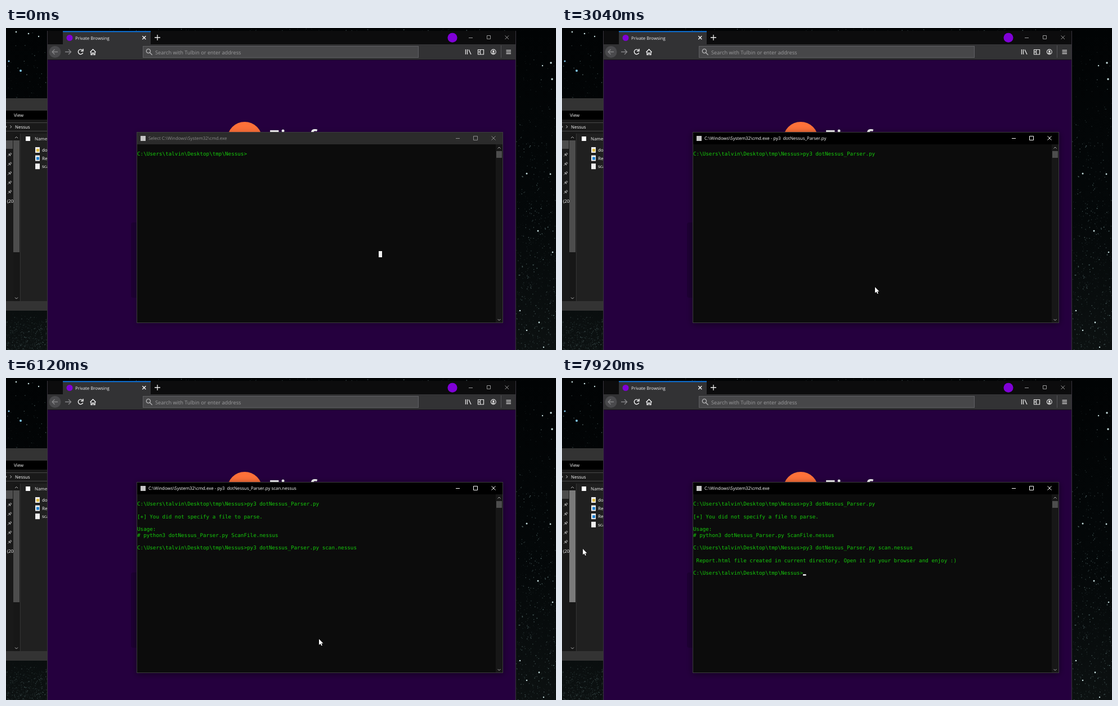
An HTML page with a canvas that plays this animation: 977 px wide and 573 px high, repeating every 8000 ms.

```html
<!DOCTYPE html>
<html lang="en">
<head>
<meta charset="utf-8">
<title>Parser demo</title>
<style>
html, body { margin: 0; width: 100%; height: 100%; overflow: hidden; background: #000; }
canvas { display: block; }
</style>
</head>
<body>
<canvas id="stage" width="977" height="573"></canvas>
<script>
const ctx = document.getElementById('stage').getContext('2d');
const LOOP = 8000;
const UI = '"Open Sans", sans-serif';
const MONO = '"DejaVu Sans Mono", monospace';

// Console grid
const CELL = 5.571, ROW = 11.14, LEFT = 233, BASE = 227.4;
const PROMPT = 'C:\\Users\\talvin\\Desktop\\tmp\\Nessus>';
const COMMAND = 'py3 dotNessus_Parser.py scan.nessus';
const TITLE = 'C:\\Windows\\System32\\cmd.exe';

// [time, characters typed]
const TYPED_FIRST = [[0, 0], [1160, 1], [1320, 2], [1440, 3], [1600, 4], [2240, 5], [2320, 6], [2400, 23]];
const TYPED_SECOND = [[0, 0], [4560, 23], [4800, 24], [4960, 25], [5120, 26], [5200, 35]];
const CARET_ON = [[840, 1920], [2240, 3040], [3240, 3800], [4560, 5960], [6280, 6880], [7840, LOOP]];
// [time, x, y] of the pointer tip
const POINTER = [[120, 590, 575], [360, 556, 461], [3800, 556, 461], [3960, 556, 464.5], [6920, 556, 464.5],
  [7400, 313, 314.5], [7640, 60, 296], [7720, 24, 300], [7800, 18, 302], [7880, 37, 304]];

function rect(x, y, w, h, color) {
  ctx.fillStyle = color;
  ctx.fillRect(x, y, w, h);
}
function frame(x, y, w, h, color) {
  ctx.strokeStyle = color;
  ctx.lineWidth = 1;
  ctx.strokeRect(x + .5, y + .5, w - 1, h - 1);
}
function disc(x, y, r, color) {
  ctx.fillStyle = color;
  ctx.beginPath();
  ctx.arc(x, y, r, 0, 7);
  ctx.fill();
}
function roundRect(x, y, w, h, r, color) {
  ctx.fillStyle = color;
  ctx.beginPath();
  ctx.roundRect(x, y, w, h, r);
  ctx.fill();
}
function stroke(path, color, width = 1) {
  ctx.strokeStyle = color;
  ctx.lineWidth = width;
  ctx.stroke(new Path2D(path));
}
function text(str, x, y, size, color, weight = 400) {
  ctx.font = `${weight} ${size}px ${UI}`;
  ctx.fillStyle = color;
  ctx.fillText(str, x, y);
}
function clipped(x, y, w, h, draw) {
  ctx.save();
  ctx.beginPath();
  ctx.rect(x, y, w, h);
  ctx.clip();
  draw();
  ctx.restore();
}
const held = (keys, t) => keys.filter(key => key[0] <= t).pop()[1];

function randomizer(seed) {
  return () => (seed = (seed * 16807) % 2147483647) / 2147483647;
}

function drawSky() {
  const glow = ctx.createLinearGradient(0, 0, 0, 573);
  glow.addColorStop(0, '#010304');
  glow.addColorStop(.6, '#040809');
  glow.addColorStop(1, '#0c1111');
  rect(0, 0, 977, 573, glow);
  const rand = randomizer(4711);
  const scatter = (count, x, y, w, h, strength) => {
    for (let i = 0; i < count; i++) {
      const size = .6 + rand() * 1.1, light = strength * (.15 + .85 * rand() ** 3);
      rect(x + rand() * w, y + Math.sqrt(rand()) * h, size, size, `rgba(165,205,205,${light})`);
    }
  };
  scatter(55, 0, 0, 73, 125, .5);
  scatter(600, 0, 503, 73, 70, .3);
  scatter(700, 906, 0, 71, 573, .55);
  scatter(60, 73, 0, 833, 5, .6);
  for (const [x, y, r] of [[26, 76, 2], [5, 59, 1.5], [58, 15, 1.2], [40, 10, 1.3], [18, 7, 1.3],
    [968, 62, 1.7], [970, 91, 1.7], [953, 67, 1.2], [925, 259, 1.5], [967, 260, 1.4],
    [945, 361, 1.5], [971, 399, 1.3], [947, 524, 1.4], [913, 503, 1.3], [925, 538, 1.3], [955, 568, 1.2]])
    disc(x, y, r, x < 30 && y > 50 ? '#7fc4e8' : '#c4dddd');
}

function drawFile(row, name, color) {
  const y = 217 + row * 14.6;
  rect(52, y - 5, 8, 10, '#f0f0f0');
  if (color) rect(54, y - 2, 5, 5, color);
  text(name, 64, y + 3, 7.9, '#fff');
}

function drawExplorer(t) {
  rect(0, 125, 73, 378, '#191919');
  rect(0, 125, 73, 22, '#333');
  rect(0, 147, 73, 16, '#000');
  text('View', 14, 158, 7.9, '#fff');
  rect(0, 168, 73, 1, '#484848');
  rect(0, 183, 73, 1, '#484848');
  stroke('M7.5 173.5l2.2 2.3l-2.2 2.3M-1 173.5l2 2.3l-2 2.3', '#ccc');
  text('Nessus', 16, 178.5, 7.9, '#fff');
  rect(25, 188, 48, 298, '#202020');
  rect(25, 188, 1, 298, '#333');
  rect(0, 200, 12, 15, '#4d4d4d');
  rect(13, 188, 11, 298, '#171717');
  rect(13, 200, 11, 199, t >= 7720 ? '#7a7a7a' : '#4d4d4d');
  stroke('M16 196l2.5-2.5l2.5 2.5M16 479.5l2.5 2.5l2.5-2.5', '#bbb');
  for (let i = 0; i < 5; i++) {
    const y = 225 + i * 16.6;
    stroke(`M3.2 ${y + 3.3}l3-3`, '#bbb', .8);
    stroke(`M4.5 ${y - 1}l3.5 3.5`, '#bbb', 1.1);
    stroke(`M6.3 ${y - .8}l2-2l1.6 1.6l-2 2z`, '#bbb', 1);
  }
  text('(20', 2, 310.5, 7.9, '#fff');
  rect(35, 193, 8, 8, '#fff');
  rect(0, 486, 73, 17, '#333');
  clipped(0, 125, 73, 378, () => {
    text('Name', 51, 200, 7.9, '#eee');
    const names = ['dotNessus_Parser.py', 'Readme.html', 'scan.nessus'];
    if (t >= 6960) names.splice(2, 0, 'Report.html');
    names.forEach((name, i) =>
      drawFile(i, name, name.endsWith('py') ? '#e0bd45' : name.endsWith('html') && '#1b7fd0'));
  });
}

function drawBrowser() {
  rect(73, 5, 833, 568, '#25003e');
  rect(73, 5, 833, 24, '#0c0c0d');
  rect(101, 6, 156, 23, '#323234');
  rect(101, 5.5, 156, 1.7, '#0a7ff5');
  disc(113, 17.5, 5.5, '#8000d7');
  text('Private Browsing', 123, 20.7, 7.8, '#f0f0f2');
  stroke('M242.3 14.3l6 6M248.3 14.3l-6 6', '#f9f9fa', 1.3);
  stroke('M264 17h10M269 12v10', '#f0f0f0', 1.3);
  disc(793, 17.3, 8.5, '#8000d7');
  stroke('M822 17.5h7M854.5 13.5h6v6h-6zM886.5 13.5l6.5 6.5M893 13.5l-6.5 6.5', '#999');

  rect(73, 29, 833, 27, '#323234');
  rect(73, 56, 833, 1, '#151017');
  disc(87, 42.5, 10.5, '#4a4a4d');
  stroke('M92 42.5h-9.5M86.5 38l-4.5 4.5l4.5 4.5', '#858587', 1.3);
  stroke('M105 42.5h10M111 38l4.5 4.5l-4.5 4.5', '#88888a', 1.3);
  stroke('M135.8 39.5a4.3 4.3 0 1 0 .8 4.5M137 37v4h-4', '#f9f9fa', 1.4);
  stroke('M149.5 43l5-5l5 5M151 42.5v5h2.2v-3h2.6v3h2.2v-5', '#f9f9fa', 1.3);
  rect(243, 32, 490, 21, '#474749');
  frame(243, 32, 490, 21, '#606063');
  stroke('M256.5 41a3.6 3.6 0 1 0-7.2 0a3.6 3.6 0 1 0 7.2 0M255.5 43.8l4.2 4.2', '#b4b4b6', 1.3);
  text('Search with Tulbin or enter address', 265, 46.5, 9.25, '#9a9a9c');
  stroke('M816.5 38v9M819.5 38v9M822 38.5l4 8.5', '#e8e8e8', 1.3);
  stroke('M838.5 38.5h10v8.5h-10zM842.5 38.5v8.5M840.5 41v3', '#e8e8e8', 1.2);
  stroke('M870.2 42.5a4.4 4.4 0 1 0-8.8 0a4.4 4.4 0 1 0 8.8 0', '#e8e8e8', 1.1);
  disc(865.8, 41.5, 1.8, '#e8e8e8');
  rect(863.4, 43.8, 4.8, 1.7, '#e8e8e8');
  rect(879, 31, 1, 22, '#545457');
  for (const y of [39, 42, 45]) rect(888.5, y, 8.5, 1.2, '#f0f0f0');

  disc(424, 198, 31, '#ff7139');
  text('Eisafum', 465.5, 209.3, 38, '#f9f9fa', 600);
  roundRect(222, 346, 460, 134, 4, '#1e0034');
  rect(73, 5, 1, 568, '#39343d');
  rect(905, 5, 1, 568, '#39343d');
}

function drawCells(str, col, row) {
  ctx.font = `9.25px ${MONO}`;
  ctx.fillStyle = '#16c60c';
  [...str].forEach((ch, i) => ctx.fillText(ch, LEFT + (col + i) * CELL, BASE + row * ROW));
}

function drawConsole(t) {
  const active = t >= 320;
  const ink = active ? '#fff' : '#8c8c8c';
  const first = COMMAND.slice(0, held(TYPED_FIRST, t));
  const second = COMMAND.slice(0, held(TYPED_SECOND, t));

  let title = TITLE;
  if (t < 1160) title = 'Select ' + TITLE;
  else if (t >= 3040 && t < 3240) title += ' - ' + first.replace(' ', '  ');
  else if (t >= 5960 && t < 6280) title += ' - ' + second.replace(' ', '  ');

  ctx.save();
  ctx.shadowColor = `rgba(0,0,0,${active ? .5 : .3})`;
  ctx.shadowBlur = 11;
  ctx.shadowOffsetY = 2;
  rect(232, 185, 651, 340, '#0c0c0c');
  ctx.restore();
  rect(232, 185, 651, 22, active ? '#000' : '#2b2b2b');
  rect(239, 192, 9, 9, '#c4c4c4');
  text(title, 253, 199.3, 7.9, ink);
  stroke('M799 196.5h7M830.5 192.5h7v7h-7zM862.5 192.5l7 7M869.5 192.5l-7 7', ink);
  rect(870, 207, 12, 317, '#171717');
  rect(871, 219, 10, 12, '#4d4d4d');
  stroke('M873.5 214.5l2.5-2.5l2.5 2.5M873.5 518l2.5 2.5l2.5-2.5', '#aaa');
  frame(232, 185, 651, 340, '#3c3c3e');

  drawCells(PROMPT + first, 0, 0);
  if (t >= 3120) {
    drawCells('[+] You did not specify a file to parse.', 0, 2);
    drawCells('Usage:', 0, 4);
    drawCells('# python3 dotNessus_Parser.py ScanFile.nessus', 0, 5);
  }
  if (t >= 3240) drawCells(PROMPT + second, 0, 7);
  if (t >= 6200) drawCells('Report.html file created in current directory. Open it in your browser and enjoy :)', 1, 9);
  if (t >= 6280) drawCells(PROMPT, 0, 11);

  if (t < 1160) rect(662, 397, 6, 11, '#f2f2f2');
  if (CARET_ON.some(([from, to]) => t >= from && t < to)) {
    const [row, typed] = t < 3040 ? [0, first] : t < 5960 ? [7, second] : [11, ''];
    rect(LEFT + (PROMPT.length + typed.length) * CELL, 226.6 + row * ROW, CELL, 2.5, '#f2f2f2');
  }
}

// The pointer moves in steps of 80 ms
function pointerAt(t) {
  const time = Math.floor((t - 40) / 80) * 80 + 40;
  const next = POINTER.findIndex(key => key[0] > time);
  if (next === 0) return POINTER[0].slice(1);
  if (next < 0) return POINTER[POINTER.length - 1].slice(1);
  const [t0, x0, y0] = POINTER[next - 1], [t1, x1, y1] = POINTER[next];
  const k = (time - t0) / (t1 - t0);
  return [x0 + (x1 - x0) * k, y0 + (y1 - y0) * k];
}

function drawPointer(x, y) {
  const arrow = new Path2D(`M${x} ${y}v10.6l2.5-2.3l1.7 3.8l1.7-.8l-1.7-3.6h3.3z`);
  ctx.strokeStyle = '#000';
  ctx.lineWidth = .8;
  ctx.stroke(arrow);
  ctx.fillStyle = '#fff';
  ctx.fill(arrow);
}

function draw(t) {
  drawSky();
  drawExplorer(t);
  drawBrowser();
  drawConsole(t);
  drawPointer(...pointerAt(t));
  if (t >= 360 && t < 520) disc(554.5, 461, 10.3, 'rgba(255,240,20,.53)');
}

ctx.textRendering = 'geometricPrecision';
function tick() {
  draw(performance.now() % LOOP);
  requestAnimationFrame(tick);
}
tick();
</script>
</body>
</html>
```
